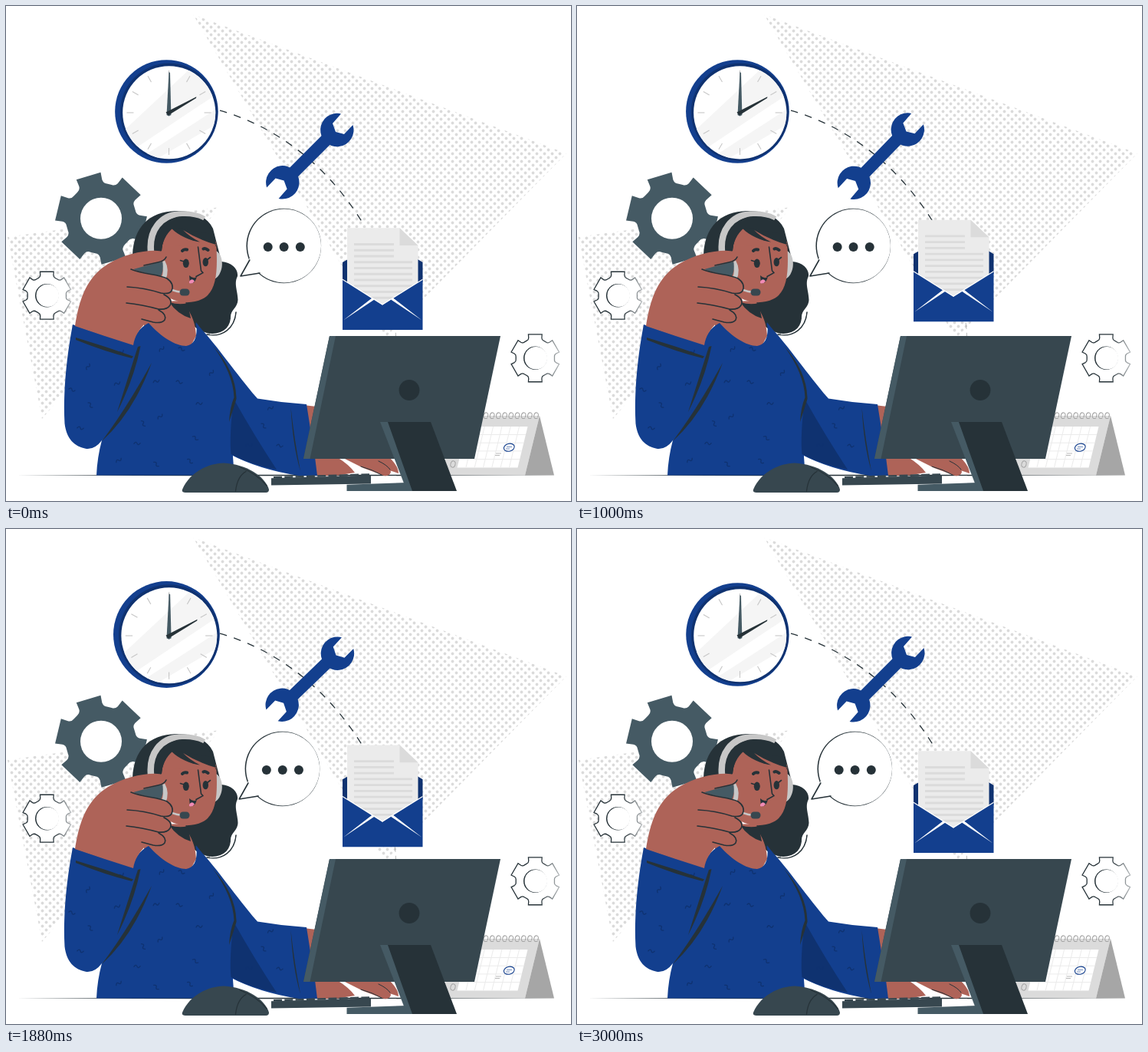
An HTML page that plays this animation: 737 by 645 pixels, repeating every 3040 ms.

```html
<!DOCTYPE html>
<html lang="en">
<head>
<meta charset="utf-8">
<title>Support agent</title>
<style>
html, body { margin: 0; width: 100%; height: 100%; overflow: hidden; background: #fff; }
svg { display: block; width: 737px; height: 645px; }
.blue { fill: #133f8e; }
.navy { fill: #0f3270; }
.ink { fill: #263238; }
.slate { fill: #37474f; }
.steel { fill: #455a64; }
.skin { fill: #ae6358; }
.pale { fill: #ebebeb; }
.grey { fill: #dbdbdb; }
.mid { fill: #c7c7c7; }
.white { fill: #fff; }
.line { fill: none; stroke: #263238; stroke-width: 1.6; stroke-linecap: round; stroke-linejoin: round; }
</style>
</head>
<body>
<svg viewBox="0 0 737 645" xmlns="http://www.w3.org/2000/svg">
  <defs>
    <pattern id="dots" width="10" height="10" patternUnits="userSpaceOnUse">
      <circle cx="2.5" cy="2.5" r="1.9" class="grey"/>
      <circle cx="7.5" cy="7.5" r="1.9" class="grey"/>
    </pattern>
    <linearGradient id="fade">
      <stop offset=".6" stop-color="#263238"/>
      <stop offset="1" stop-color="#263238" stop-opacity=".35"/>
    </linearGradient>
    <clipPath id="face"><circle cx="212.7" cy="138.8" r="60.5"/></clipPath>
    <clipPath id="rim"><circle cx="209.4" cy="137.5" r="67.2"/></clipPath>
  </defs>

  <path fill="url(#dots)" d="M244 11L731 192 494 433ZM2 301L279 262 47 538Z"/>
  <path class="line" style="stroke-width:1.3;stroke-linecap:butt" stroke-dasharray="9.5 9.6" d="M279 136.2C350 156 419 206 466 284"/>
  <path d="M505 400Q508 415 508.5 430" fill="none" stroke="#a6a6a6" stroke-width=".8" stroke-dasharray="8 5"/>

  <g id="clock">
    <circle cx="209.4" cy="137.5" r="67.2" class="blue"/>
    <circle cx="212.6" cy="138.2" r="63.6" class="navy" clip-path="url(#rim)"/>
    <circle cx="212.7" cy="138.8" r="60.5" class="white"/>
    <path clip-path="url(#face)" fill="#f5f5f5" d="M150 166L242 80 262 100 270 118 171 184 158 178ZM180 195L276 133 276 153 192 202Z"/>
    <g id="ticks" stroke="#c7c7c7" stroke-width="1.1"></g>
    <path class="steel" d="M212.5 86L214 87 215.4 142 212.5 143.5 209.5 142Z"/>
    <path class="ink" d="M248.3 118.3L248 120 211.5 142.5 208.5 138.6Z"/>
  </g>

  <g id="wrench">
    <path d="M421 171L371.6 220.4" stroke="#133f8e" stroke-width="16"/>
    <path id="head" class="blue" d="M437 140.5A21.7 21.7 0 1 0 452.5 155L441 167 430 164 426 153Z"/>
    <use href="#head" transform="rotate(180 396.3 195.7)"/>
  </g>

  <g id="gears"></g>

  <g id="bubble">
    <circle cx="362.3" cy="312.5" r="48.8" class="ink"/>
    <circle cx="363" cy="312.5" r="48" class="white"/>
    <path class="white" d="M318 328L306 352 333 347 340 330Z"/>
    <path class="line" d="M317.8 331L306 352 331 348"/>
    <circle cx="341.7" cy="314" r="6" class="ink"/>
    <circle cx="362.6" cy="314" r="6" class="ink"/>
    <circle cx="383.8" cy="314" r="6" class="ink"/>
  </g>

  <g id="mail">
    <path class="navy" d="M439 334L446 330H537L543.5 334V360H439Z"/>
    <path class="pale" d="M445 289.3H513.5L537.5 312V365L491 392 445 365Z"/>
    <path class="grey" d="M513.5 289.3L537.5 312H513.5Z"/>
    <g id="rows" stroke="#dbdbdb" stroke-width="2.8"></g>
    <path class="blue" d="M439 356.3L491 389.5 543.5 356.3V422H439Z"/>
    <path d="M439 356.3L491 389 543.5 356.3" fill="none" stroke="#fff" stroke-width="1.2"/>
    <path class="white" d="M440 409.5L477.5 380.5 480.5 382.5ZM542.5 409.5L505 380.5 502 382.5Z"/>
  </g>

  <!-- desk line and calendar -->
  <path class="ink" d="M14 611.6L250 610.7H480L716 611.6 480 612.2H250Z"/>
  <path class="grey" d="M616 534H696L677 611.5H558Z"/>
  <path fill="#a6a6a6" d="M696 534L715 611.5H677Z"/>
  <path class="white" d="M602 548H680.5L667.5 601.5H588.5Z"/>
  <g id="grid" stroke="#ebebeb" stroke-width="1"></g>
  <g id="rings" fill="none" stroke="#a6a6a6" stroke-width="1.1"></g>
  <ellipse cx="583" cy="597" rx="3" ry="4.2" transform="rotate(15 583 597)" fill="none" stroke="#a6a6a6"/>
  <g fill="none" stroke="#133f8e">
    <ellipse cx="656.2" cy="575.3" rx="7" ry="4.9" transform="rotate(-15 656 575)" stroke-width="1.1"/>
    <path d="M653 574.5H660M652 577H657" stroke-width=".6"/>
  </g>
  <path d="M639 583H646M638 585.5H644" stroke="#a6a6a6" stroke-width=".8"/>

  <!-- hair behind the head -->
  <path class="ink" d="M165 324C167 288 186 268 222 267C246 267 262 274 270 290L281 333C295 334 303 343 302 352C297 362 302 370 302.5 383C302 394 292 396 293 407C291 423 278 429 266 427C247 423 237 412 237 400L228 380 185 335Z"/>
  <path class="line" d="M300 399C298 420 283 432 262 428"/>
  <path d="M298.5 398C297 417 283 429 266 427.5" fill="none" stroke="#fff" stroke-width="1.4"/>
  <path class="mid" d="M271 318C282 320 284 337 280 346Q277 354 271 356Z"/>

  <!-- neck and face -->
  <path class="skin" d="M180 414L200 385 234 384C236 398 247 404 248 430L236 452 210 446 180 424Z"/>
  <path class="ink" d="M213 386Q226 390 237 387L241 407Q224 402 213 386Z"/>
  <path class="skin" d="M202 322C204 306 209 297 217 290L274 307C276 338 276 364 263 377C250 389 224 389 210 378L198 354Z"/>
  <path class="ink" d="M274 313C250 309 228 302 216 290C208 297 204 306 203 319H190C188 290 205 272 232 272C258 272 273 289 274 313Z"/>
  <path class="skin" d="M214 293Q230 305 253 307.5Q240 301 231 292Q250 304 274 311L270 316 214 312Z"/>
  <path d="M189 320C186.5 292 202 272.5 226 271.5C240 271 250 273 258 278" fill="none" stroke="#c7c7c7" stroke-width="8.5"/>
  <path class="ink" d="M194.5 318C194 292 208 275 230 274Q252 273 264 284L268 297 232 291 215 290Q204 301 203 319Z"/>
  <path class="line" d="M230 319Q232 316.5 236 317.5M257.5 316.5Q260 315 263.5 318" style="stroke-width:4"/>
  <ellipse cx="234.8" cy="335.3" rx="4" ry="5.8" class="ink"/>
  <ellipse cx="260.3" cy="333.7" rx="3.7" ry="5.6" class="ink"/>
  <path class="line" d="M232 333L227.5 331.5M262 331L266.5 327.5M250.5 314L254.5 345 257 347.5 248 352.5"/>
  <path class="ink" d="M239 351Q244 356 249 353Q246 363 240 361Z"/>
  <path d="M239 359Q242 354 246 358.5Q243 363 239 361Z" fill="#f18bb5"/>
  <path d="M204 332Q211 345 205 356" fill="none" stroke="#c7c7c7" stroke-width="6"/>
  <path d="M207 364Q216 372 230 373" fill="none" stroke="#c7c7c7" stroke-width="2.6"/>
  <rect x="226.5" y="368.5" width="13" height="9" rx="4.4" class="slate"/>

  <!-- typing hand and torso -->
  <path class="skin" d="M388 520L405 522 397 570 386 560ZM398 588H432Q448 598 455 608L430 612H400ZM438 588H490Q500 598 502 607Q501 613 493 612L466 602ZM466 588H500Q512 600 512 609L500 605Z"/>
  <path class="line" d="M463 600Q478 604 490 611M486 593Q497 598 501 604" style="stroke-width:1"/>
  <g class="blue">
    <path d="M247 413C268 432 299 478 328 511.5Q360 517 392 519L403 588 406 612H382Q330 604 292 584Z"/>
    <path d="M164 445Q168 422 186 413C202 431 221 443 235 443C248 441 250 427 248 412C274 448 300 480 300 515C293 545 295 582 298 611.5H118Q119 588 125 566Z"/>
    <path d="M87 415Q128 430 176 443C167 490 153 532 125 566Q116 578 105 577C89 574 79 564 76.5 544C74 500 80 452 87 415Z"/>
  </g>
  <path class="navy" d="M297 512Q324 560 353 604Q320 598 293.5 584Q291 560 297 512Z"/>
  <g id="squiggles" class="line" style="stroke:#0f3270;stroke-width:1.3"></g>
  <g class="ink">
    <path d="M91 432Q128 443 166 456.5L164 459Q128 450 91 435Z"/>
    <path d="M175.5 443Q167 486 145 529Q158 488 172 444Z"/>
    <path d="M190 465Q166 530 125 567Q156 526 190 465Z"/>
    <path d="M270 443Q300 476 300.5 512Q296 527 291 542Q292 523 297.5 510Q296 478 270 443Z"/>
    <path d="M371.5 523Q376 565 384 606Q374 572 371.5 523Z"/>
  </g>

  <!-- raised arm and hand -->
  <path class="steel" d="M164 343L204 331Q207 350 198 356L168 346Z"/>
  <path class="skin" d="M90 417C95 384 104 358 126 341C145 327 166 321 187 319Q208 317 211 326Q209 333 199 334L166 343C180 349 199 349 211 356Q219 361 216 370L210 376Q218 381 215 389Q212 395 202 396L208 403Q210 410 203 413L184 411C173 422 168 430 166 442Q128 430 90 417Z"/>
  <path class="line" d="M163 343C180 350 198 349 210 355Q220 362 216 371Q213 376 202 374Q180 367 158 366M206 376Q218 382 214 390Q210 396 199 395Q177 389 157 387M199 396Q210 402 207 409Q203 414 192 412L177 408M209 327Q207 332 198 334L180 338"/>

  <!-- keyboard, screen and mouse -->
  <path class="slate" d="M346 615.3L476 611.5V622.5L346 624.5Z"/>
  <path d="M349 614.3L474 610.5" stroke="#37474f" stroke-width="2.6" stroke-dasharray="11 3.3"/>
  <path class="steel" d="M444.5 623.7L524 621 532 632H444.5Z"/>
  <path class="slate" d="M422 430H645L611 590H388Z"/>
  <path class="steel" d="M422 430H430L396.5 590H388Z"/>
  <circle cx="526" cy="500.5" r="13.4" class="ink"/>
  <path class="steel" d="M488 542H499L532 632H523Z"/>
  <path class="ink" d="M498 542H554L588 632H530Z"/>
  <path class="slate" d="M230 630C238 610 261 596 284 595.5C314 597 338 613 343 630Q343 634 339 634H234Q229 634 230 630Z"/>
  <path class="line" d="M299.5 632C301 619 305 611 313 606.5M305 601Q327 609 340 625" style="stroke-width:1.3"/>
</svg>

<script>
const LOOP = 3040, CYCLE = 1500, UNIT = 1.55;
const byId = id => document.getElementById(id);
const repeat = (n, fn) => Array.from({ length: n }, (_, i) => fn(i)).join('');
const line = (x1, y1, x2, y2) => `<path d="M${x1} ${y1}L${x2} ${y2}"/>`;

// Six-toothed gear outline around (0,0); rot is one tooth's direction in degrees.
function gearPath(outer, root, rot) {
  const at = (r, deg) => {
    const a = deg * Math.PI / 180;
    return `${(r * Math.cos(a)).toFixed(2)} ${(r * Math.sin(a)).toFixed(2)}`;
  };
  return 'M' + repeat(6, i => {
    const a = rot + i * 60;
    return `${i ? 'L' : ''}${at(outer, a - 16)}L${at(outer, a + 16)}` +
      `L${at(root * 1.1, a + 18)}Q${at(root, a + 20)} ${at(root, a + 26)}` +
      `L${at(root, a + 34)}Q${at(root, a + 40)} ${at(root * 1.1, a + 42)}`;
  }) + 'Z';
}

function outlineGear(x, y) {
  return `<g transform="translate(${x} ${y})">
    <path fill="#fff" stroke="url(#fade)" stroke-width="1.3" d="${gearPath(32.2, 25.2, 90)}"/>
    <circle r="15.3" class="ink"/><circle cx="1" r="14.8" class="white"/></g>`;
}

byId('gears').innerHTML =
  `<g transform="translate(124 276.8)"><path class="steel" d="${gearPath(60, 46, -106.5)}"/>
   <circle r="27" class="white"/></g>` + outlineGear(53.3, 377.2) + outlineGear(690.3, 458.8);

byId('ticks').innerHTML = repeat(12, i =>
  `<path d="M212.5 84V93" transform="rotate(${i * 30} 212.5 139)"/>`);
byId('rows').innerHTML = repeat(10, i => {
  const y = 310.5 + i * 7.75;
  return line(454, y, i < 3 ? 506 : 530, y);
});
byId('grid').innerHTML =
  repeat(6, i => line(613 + i * 11.3, 548, 600 + i * 11.3, 601)) +
  repeat(4, i => line(600 - i * 2.6, 558.5 + i * 10.7, 678 - i * 2.6, 558.5 + i * 10.7));
byId('rings').innerHTML = repeat(9, i =>
  `<path d="M${628 + i * 8.2} 537q-5 2-5-3 1-5 4-4 3 1 1 6"/>`);

const marks = [[107, 470], [86, 500], [145, 492], [110, 520], [97, 550], [147, 592], [196, 597],
  [171, 570], [201, 535], [247, 563], [252, 518], [268, 478], [229, 447], [196, 489], [179, 544],
  [226, 490], [345, 524], [336, 547], [357, 573], [150, 451], [240, 593], [317, 572], [203, 447]];
byId('squiggles').innerHTML = marks.map(([x, y], i) =>
  `<path d="M${x - 4} ${y + 1}q2-4 4-1t4-1" transform="rotate(${i * 77 % 120 - 50} ${x} ${y})"/>`).join('');

// Piecewise linear through evenly spaced values.
function track(values, p) {
  const pos = p * (values.length - 1), i = Math.min(Math.floor(pos), values.length - 2);
  return values[i] + (values[i + 1] - values[i]) * (pos - i);
}

const SHAKE = [0, -1, 2, -4, 4, -4, 4, -4, 2, -1, 0];
const beat = (t, peak) => Math.max(0, 1 - Math.abs(t - peak) / 550) ** 1.8;

function draw(time) {
  const t = Math.min(time % LOOP, 2 * CYCLE);
  const p = t % CYCLE / CYCLE;
  const scale = 1 + .1 * (beat(t, 510) + beat(t, 1625));
  const rise = .75 * (1 - Math.abs(1 - 2 * p)) + .25 * (1 - Math.cos(2 * Math.PI * p)) / 2;

  byId('clock').setAttribute('transform',
    `translate(209.4 137.5) scale(${scale}) translate(-209.4 -137.5)`);
  byId('wrench').setAttribute('transform', `rotate(${Math.sin(2 * Math.PI * p)} 396.3 195.7)`);
  byId('bubble').setAttribute('transform', `translate(${UNIT * track(SHAKE, p)} 0)`);
  byId('mail').setAttribute('transform', `translate(0 ${-10 * UNIT * rise})`);
}

let start;
function tick(now) {
  start ??= now;
  draw(now - start);
  requestAnimationFrame(tick);
}
draw(0);
requestAnimationFrame(tick);
</script>
</body>
</html>
```
